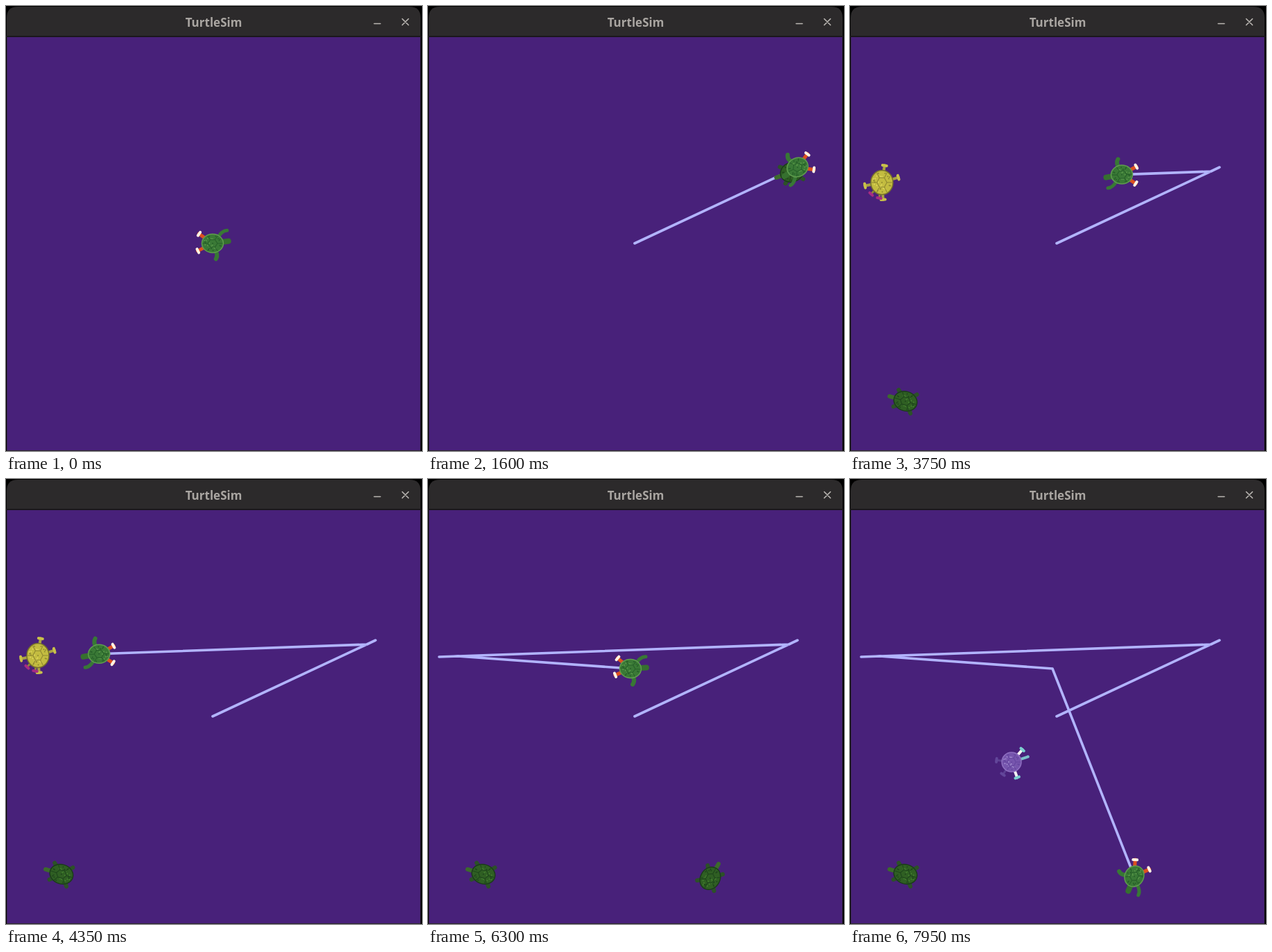
Recreate the animation shown at these times as an HTML page. Size 600x643 px, loop 8000 ms.

```html
<!DOCTYPE html>
<html lang="en">
<head>
<meta charset="utf-8">
<title>TurtleSim</title>
<style>
html, body { margin: 0; width: 100%; height: 100%; overflow: hidden; background: #000; }
svg { display: block; width: 600px; height: 643px; }
text { font: 700 17px "Open Sans", "Noto Sans", sans-serif; fill: #aaa6a2; }
</style>
</head>
<body>
<svg viewBox="0 0 600 643" stroke-linecap="round" stroke-linejoin="round">
  <path d="M1 643V17Q1 1 17 1H582Q598 1 598 17V643Z" fill="#2c2a2b"/>
  <path d="M1 44H598" stroke="#1b181c" stroke-width="2"/>
  <rect x="1.5" y="45" width="596" height="597" fill="#48217a"/>
  <text x="299.5" y="30" text-anchor="middle">TurtleSim</text>
  <path d="M531 25.5H540M571.5 18.5L580.5 27.5M580.5 18.5L571.5 27.5" stroke="#bbb7b3" stroke-width="1.6"/>
  <polyline id="trail" fill="none" stroke="#b2b4ff" stroke-width="3.6"/>
  <g id="turtles"></g>
</svg>
<script>
const LOOP = 8000, STEP = 50;
const SPEED = 0.43, TURN_TIME = 300;

// Limbs are polar: angle in degrees, reach from the shell centre.
const limb = (angle, reach, color, width = 5, more = {}) => ({ angle, reach, color, width, ...more });
const foot = { toe: "#fff3e4" };

const kinds = {
  hero: {
    rx: 15.5, ry: 13.5, fill: "#3a7936", edge: "#5f9c4e", line: "#27602a", light: "#5a984a",
    limbs: [
      limb(-8, 23, "#36702f", 8),
      limb(-42, 28, "#387835", 5, { bend: -14 }),
      limb(78, 23, "#387835", 6, { bend: -18 }),
      limb(215, 24, "#dd501f", 5, foot),
      limb(153, 24, "#dd501f", 5, foot)
    ]
  },
  pond: {
    rx: 17, ry: 14, fill: "#2f5f23", edge: "#1b3c1b", line: "#1f461c", light: "#44802f",
    limbs: [
      limb(0, 24, "#3c6a2c", 6),
      ...[42, -41, 133, 231].map(angle => limb(angle, 19, "#2c5128", 6))
    ]
  },
  yellow: {
    rx: 16, ry: 17.5, fill: "#c3bc40", edge: "#77712c", line: "#8f8831", light: "#e0d85c",
    limbs: [
      ...[-81, -17, 86, 169].map(angle => limb(angle, 25, "#a9a243", 4, { toe: "#c9c14a" })),
      ...[100, 133].map(angle => limb(angle, 23, "#8f8738", 3, { toe: "#a72c82" }))
    ]
  },
  blue: {
    rx: 15, ry: 13, fill: "#2f88cc", edge: "#2565aa", line: "#2468b0", light: "#b3e2f5",
    limbs: [
      ...[-9, 38, 210].map(angle => limb(angle, 20, "#2f86c8", 5)),
      limb(242, 27, "#9cd7ef", 4, { bend: 10, toe: "#dff4f8" })
    ]
  },
  purple: {
    rx: 14, ry: 14, fill: "#7655ad", edge: "#8e6fc0", line: "#6647a0", light: "#a18bcf",
    limbs: [
      ...[125, 187].map(angle => limb(angle, 22, "#5c4092", 3, { toe: "#62469a" })),
      ...[-49, 70].map(angle => limb(angle, 24, "#f4f2f3", 4, { toe: "#7bd0cf" })),
      limb(-18, 25, "#7bbfca", 4)
    ]
  }
};

const targets = [
  { kind: "pond", x: 525, y: 240, turn: 161, from: 150, to: 2200 },
  { kind: "yellow", x: 46, y: 255, turn: 0, from: 1700, to: 4800 },
  { kind: "pond", x: 80, y: 571, turn: 197, from: 3150, to: LOOP },
  { kind: "blue", x: 291, y: 278, turn: 0, from: 4750, to: 5850 },
  { kind: "pond", x: 407, y: 577, turn: 300, from: 6300, to: 7750 },
  { kind: "purple", x: 233, y: 409, turn: 0, from: 7800, to: LOOP }
];

// The hero faces each goal from `turn` on, then drives there at `leave`.
const home = { x: 298, y: 343 };
const legs = [
  { x: 533, y: 233, turn: 150, leave: 450 },
  { x: 521, y: 239, turn: 1100, leave: 1850 },
  { x: 16, y: 257, turn: 3150, leave: 3450 },
  { x: 43, y: 256, turn: 4620, leave: 4760 },
  { x: 292, y: 274, turn: 4830, leave: 5050 },
  { x: 410, y: 574, turn: 6300, leave: 6655 },
  { x: 233, y: 409, turn: 7800, leave: 8250 }
];

const DEG = Math.PI / 180;
const clamp = v => Math.min(1, Math.max(0, v));
const polar = (angle, rx, ry = rx) => [rx * Math.cos(angle * DEG), ry * Math.sin(angle * DEG)];

function add(parent, tag, attributes) {
  const node = document.createElementNS("http://www.w3.org/2000/svg", tag);
  for (const name in attributes) node.setAttribute(name, attributes[name]);
  parent.append(node);
  return node;
}

function seeded(seed) {
  return () => (seed = seed * 16807 % 2147483647) / 2147483647;
}

function stroke(parent, d, color, width) {
  add(parent, "path", { d, fill: "none", stroke: color, "stroke-width": width });
}

function addLimb(group, { angle, reach, color, width, bend = 0, toe }) {
  const tip = polar(angle, reach);
  stroke(group, `M${polar(angle, 8)}Q${polar(angle + bend, reach * 0.8)} ${tip}`, color, width);
  if (toe) stroke(group, `M${polar(angle - 7, reach)}L${polar(angle + 7, reach)}`, toe, 4);
}

function addShell(group, { rx, ry, fill, edge, line, light }) {
  add(group, "ellipse", { rx, ry, fill, stroke: edge, "stroke-width": 1.5 });
  const random = seeded(7);
  for (let i = 0; i < 30; i++) {
    const radius = Math.sqrt(random()) * 0.85;
    const [cx, cy] = polar(random() * 360, rx * radius, ry * radius);
    add(group, "circle", { cx, cy, r: 1, fill: i % 2 ? light : line });
  }
  const corners = [0, 60, 120, 180, 240, 300];
  const hexagon = corners.map(angle => polar(angle, rx * 0.45, ry * 0.45));
  const ribs = corners.map((angle, i) => `M${hexagon[i]}L${polar(angle, rx * 0.9, ry * 0.9)}`);
  stroke(group, `M${hexagon.join("L")}Z${ribs.join("")}`, line, 1.1);
}

function makeTurtle(kind) {
  const group = add(document.getElementById("turtles"), "g", {});
  kinds[kind].limbs.forEach(part => addLimb(group, part));
  addShell(group, kinds[kind]);
  return group;
}

const place = (node, x, y, turn) =>
  node.setAttribute("transform", `translate(${x} ${y}) rotate(${turn})`);

for (const target of targets) {
  target.node = makeTurtle(target.kind);
  place(target.node, target.x, target.y, target.turn);
}
const hero = makeTurtle("hero");
const trail = document.getElementById("trail");

function heroAt(time) {
  let { x, y } = home, heading = 0;
  const points = [[x, y]];
  for (const leg of legs) {
    if (time < leg.turn) break;
    const dx = leg.x - x, dy = leg.y - y;
    const goal = Math.atan2(dy, dx) / DEG;
    const swing = ((goal - heading + 540) % 360 + 360) % 360 - 180;
    const turnTime = leg.leave > LOOP ? leg.leave - leg.turn : Math.min(TURN_TIME, leg.leave - leg.turn);
    heading += swing * clamp((time - leg.turn) / turnTime);
    const driven = clamp((time - leg.leave) * SPEED / Math.hypot(dx, dy));
    x += dx * driven;
    y += dy * driven;
    points.push([x, y]);
  }
  return { x, y, heading, points };
}

function draw(time) {
  const { x, y, heading, points } = heroAt(time);
  trail.setAttribute("points", points.join(" "));
  place(hero, x, y, heading);
  for (const { node, from, to } of targets) {
    node.setAttribute("visibility", time >= from && time < to ? "visible" : "hidden");
  }
}

const start = performance.now();
function tick() {
  const time = (performance.now() - start) % LOOP;
  draw(Math.floor(time / STEP) * STEP);
  requestAnimationFrame(tick);
}
tick();
</script>
</body>
</html>
```
